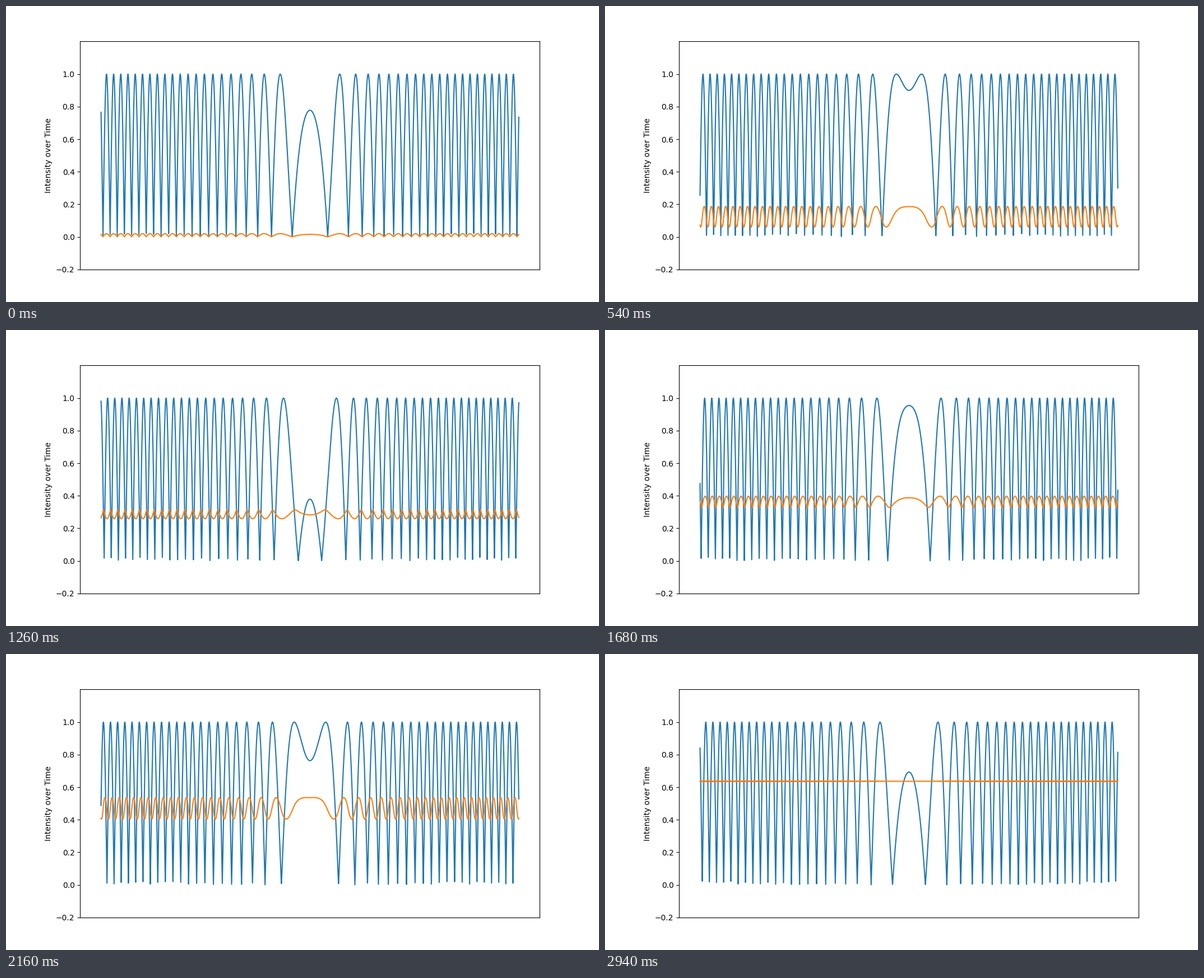
Animation of 1058 by 529 pixels, one loop 3 s. Source, as a matplotlib script:

```python
import numpy as np
import matplotlib.pyplot as plt
from matplotlib.animation import FuncAnimation

WIDTH, HEIGHT, DPI = 1058, 529, 100
FRAMES, INTERVAL = 50, 60
POINTS = 4000

K = 100.05        # wave number per half width of the screen
DEPTH = 0.4       # distance from the emitter to the screen
PHASE = 0.8915    # phase at the screen centre at the start

# Circular wave reaching a flat screen
x = np.linspace(-1, 1, POINTS, endpoint=False)
delay = K * (np.hypot(x, DEPTH) - DEPTH)
steps = 2 * np.pi * np.arange(FRAMES) / FRAMES
wave = np.abs(np.sin(PHASE + steps[:, None] - delay))
exposure = np.cumsum(wave, axis=0) / FRAMES

fig, ax = plt.subplots(figsize=(WIDTH / DPI, HEIGHT / DPI), dpi=DPI)
fig.subplots_adjust(left=0.125, right=0.9, bottom=0.11, top=0.88)
wave_line, = ax.plot(x, wave[0], color="tab:blue", lw=1.5)
sum_line, = ax.plot(x, exposure[0], color="tab:orange", lw=1.5)
ax.set_xticks([])
ax.set_yticks(np.arange(-1, 6) / 5)
ax.set_ylim(-0.2, 1.2)
ax.set_ylabel("Intensity over Time")


def update(i):
    wave_line.set_ydata(wave[i])
    sum_line.set_ydata(exposure[i])
    return wave_line, sum_line


anim = FuncAnimation(fig, update, frames=FRAMES, interval=INTERVAL,
                     repeat=True, repeat_delay=0)
plt.show()
```
